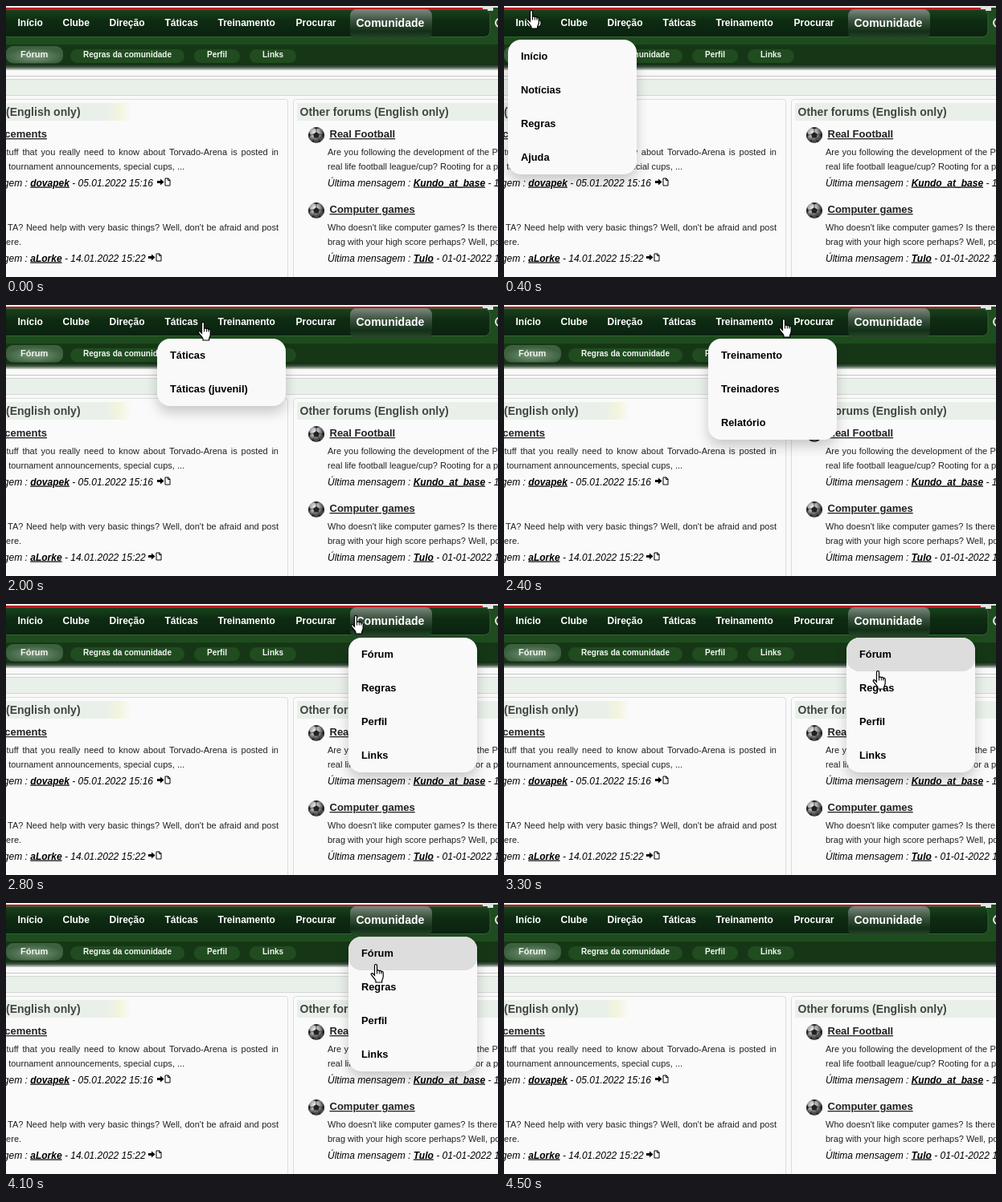
These frames come from a looping animation (612 px wide and 338 px high, 5.7 s). An HTML page:

```html
<!DOCTYPE html>
<html lang="pt">
<head>
<meta charset="utf-8">
<title>Menu</title>
<style>
html, body { margin: 0; width: 100%; height: 100%; overflow: hidden; background: #f9f9f9; }
#stage { position: relative; width: 612px; height: 338px; overflow: hidden; font-family: "Liberation Sans", Arial, sans-serif; }
#stage > svg { position: absolute; left: 0; top: 0; }
.nav { font-weight: bold; font-size: 12px; fill: #fff; }
.sub { font-weight: bold; font-size: 10px; fill: #f2f6f2; }
.head { font-weight: bold; font-size: 14px; fill: #444; }
.topic { font-weight: bold; font-size: 13px; fill: #222; text-decoration: underline; }
.body { font-size: 11px; fill: #222; }
.last { font-size: 12px; font-style: italic; fill: #000; }
.user { font-weight: bold; text-decoration: underline; }
.line { position: absolute; font-size: 11px; line-height: 13px; color: #222; white-space: nowrap; text-align: justify; text-align-last: justify; }
.menu { position: absolute; top: 42px; width: 160px; border-radius: 16px; background: #f9f9f9; box-shadow: 0 8px 16px rgba(0, 0, 0, .2); visibility: hidden; }
.menu div { height: 42px; padding-left: 16px; border-radius: 16px; font: bold 12.8px/41px "Liberation Sans", Arial, sans-serif; color: #000; }
.menu .on { background: #ddd; }
</style>
</head>
<body>
<div id="stage">
<svg width="612" height="338">
  <defs>
    <linearGradient id="bar" x2="0" y2="1">
      <stop stop-color="#1a421d"/><stop offset=".4" stop-color="#0e2c12"/><stop offset="1" stop-color="#0a2210"/>
    </linearGradient>
    <linearGradient id="tab" x2="0" y2="1">
      <stop stop-color="#7c887d"/><stop offset=".4" stop-color="#39503c"/><stop offset=".75" stop-color="#122f17"/><stop offset="1" stop-color="#2a4a2c"/>
    </linearGradient>
    <linearGradient id="edge" x2="0" y2="1">
      <stop stop-color="#0c290f"/><stop offset=".45" stop-color="#3c523e"/><stop offset="1" stop-color="#f9f9f9"/>
    </linearGradient>
    <radialGradient id="pill" cy=".6">
      <stop stop-color="#7b977b"/><stop offset="1" stop-color="#3d613f"/>
    </radialGradient>
    <linearGradient id="fade">
      <stop offset=".8" stop-color="#e9f0e9"/><stop offset=".9" stop-color="#f3f4dc"/><stop offset="1" stop-color="#fafafa"/>
    </linearGradient>
    <radialGradient id="leather" cx=".4" cy=".35">
      <stop stop-color="#f2f2f2"/><stop offset=".6" stop-color="#a2a2a2"/><stop offset="1" stop-color="#4a4a4a"/>
    </radialGradient>
    <g id="ball">
      <circle r="10" fill="url(#leather)"/>
      <path d="M0-4 4-1 2.5 3.5H-2.5L-4-1ZM-4-9 0-7.5 4-9 0-10ZM9-4 7 0 9.2 4 10 0ZM-9-4-7 0-9.2 4-10 0ZM-6 8-4 6-1 9.5ZM6 8 4 6 1 9.5Z" fill="#222"/>
      <path d="M0-4V-8M4-1 7 0M2.5 3.5 4 6M-2.5 3.5-4 6M-4-1-7 0" stroke="#444" stroke-width=".8"/>
    </g>
    <g id="goto">
      <path d="M0 3.5H4V1L8.500 5 4 9V6.500H0Z"/>
      <path d="M10 .5H14L16 2.500V9.500H10Z M13.500 .5V3H16" fill="#fff" stroke="#000"/>
    </g>
  </defs>

  <rect width="612" height="80" fill="#1e4c1e"/>
  <rect width="612" height="2" fill="#f6eeee"/>
  <rect y="2" width="593" height="2" fill="#bd1821"/>
  <path d="M593 0H612V2H606V6H599V4H593Z" fill="#e4e4e4"/>
  <rect x="-12" y="4.500" width="614" height="34" rx="7" fill="url(#bar)" stroke="#37603a"/>
  <rect x="428" y="4" width="102" height="37" rx="8" fill="url(#tab)"/>
  <circle cx="614" cy="21" r="5" fill="none" stroke="#e6e6e6" stroke-width="2"/>
  <g id="nav" class="nav"></g>

  <rect y="48" width="612" height="24" fill="#163716"/>
  <rect y="72" width="612" height="9" fill="url(#edge)"/>
  <rect x="0" y="50" width="71" height="21.500" rx="9" fill="url(#pill)"/>
  <g fill="#204c20">
    <rect x="80" y="54" width="142" height="17" rx="8.500"/>
    <rect x="234" y="54" width="57" height="17" rx="8.500"/>
    <rect x="303" y="54" width="58" height="17" rx="8.500"/>
  </g>
  <g class="sub">
    <text x="18" y="64" font-size="11" style="font-size:11px">Fórum</text>
    <text x="96" y="64">Regras da comunidade</text>
    <text x="250" y="64">Perfil</text>
    <text x="319" y="64">Links</text>
  </g>

  <rect y="80" width="612" height="258" fill="#f9f9f9"/>
  <rect y="87" width="612" height="1" fill="#c6c6c6"/>
  <rect x="-2" y="91.500" width="616" height="20" fill="#e9f0e9" stroke="#d2d6d2"/>
  <g fill="#fafafa" stroke="#dcdcdc">
    <rect x="-10" y="116.500" width="360.500" height="240" rx="3"/>
    <rect x="357.500" y="116.500" width="270" height="240" rx="3"/>
  </g>
  <rect y="121" width="156" height="22" fill="url(#fade)"/>
  <rect x="362" y="121" width="250" height="22" fill="#e9f0e9"/>
  <g class="head">
    <text x="0" y="137">(English only)</text>
    <text x="365.500" y="137">Other forums (English only)</text>
  </g>

  <use href="#ball" x="386" y="161"/>
  <use href="#ball" x="386" y="255"/>
  <g class="topic">
    <text x="51" y="164" text-anchor="end">Announcements</text>
    <text x="402.500" y="164">Real Football</text>
    <text x="402.500" y="258">Computer games</text>
  </g>
  <g class="body">
    <text x="-6" y="204">a tournament announcements, special cups, ...</text>
    <text x="-6" y="298">here.</text>
    <text x="400" y="186" word-spacing=".4">Are you following the development of the Premier</text>
    <text x="400" y="204">real life football league/cup? Rooting for a particular</text>
    <text x="400" y="280">Who doesn't like computer games? Is there a</text>
    <text x="400" y="298">brag with your high score perhaps? Well, post</text>
  </g>
  <g class="last">
    <text x="-76.500" y="224.500">Última mensagem : <tspan class="user">dovapek</tspan> - 05.01.2022 15:16</text>
    <text x="-76.500" y="318.500">Última mensagem : <tspan class="user">aLorke</tspan> - 14.01.2022 15:22</text>
    <text x="400" y="224.500">Última mensagem : <tspan class="user">Kundo_at_base</tspan> - 14.01.2022</text>
    <text x="400" y="318.500">Última mensagem : <tspan class="user">Tulo</tspan> - 01-01-2022 15:40</text>
  </g>
  <use href="#goto" x="188" y="214.500"/>
  <use href="#goto" x="177" y="308.500"/>
</svg>

<div class="line" style="left:-5px;width:344px;top:176px">stuff that you really need to know about Torvado-Arena is posted in</div>
<div class="line" style="left:2px;width:337px;top:270px">TA? Need help with very basic things? Well, don't be afraid and post</div>

<div id="menus"></div>

<svg id="hand" width="18" height="25" viewBox="-.5 -.5 18 25">
  <path d="M5 1.500c0-2 3-2 3 0v7c.3-1.500 2.600-1.500 2.800.2c.4-1.200 2.400-1 2.600.6c.5-.9 2.200-.7 2.300.8v5.500c0 2-1.600 3.400-1.600 5.400v1.500h-7.600v-1.600c0-1.600-4-5.200-5.600-8c-.7-1.500 1-2.400 2-1.400l2.100 2.300z" fill="#fff" stroke="#000" stroke-width="1.200"/>
  <path d="M8 8.500v3.500M10.800 8.700v3.300M13.400 9.300v2.700" stroke="#000"/>
</svg>
</div>

<script>
const LOOP = 5700, STEP = 100, SHOW = 300, HIDE = 4500;
const ROW = 42, MENU_TOP = 42;

// label, left edge of the hover area, entries
const nav = [
  ['Início', 5, ['Início', 'Notícias', 'Regras', 'Ajuda']],
  ['Clube', 61, ['Clube', 'Jogadores', 'Juvenis', 'Jogos', 'Transferências', 'Troféus', 'Histórico']],
  ['Direção', 119, ['Finanças', 'Estádio', 'Instalações', 'Patrocinadores', 'Calendário']],
  ['Táticas', 188, ['Táticas', 'Táticas (juvenil)']],
  ['Treinamento', 254, ['Treinamento', 'Treinadores', 'Relatório']],
  ['Procurar', 351, ['Jogadores', 'Clubes', 'Treinadores', 'Países', 'Transferências', 'Amistosos']],
  ['Comunidade', 426, ['Fórum', 'Regras', 'Perfil', 'Links']]
];

// time, x, y of the fingertip
const path = [
  [300, 30, 1], [400, 34, 5], [600, 60, 15], [900, 106, 21], [1100, 137, 21],
  [1400, 168, 21], [1500, 168, 21], [2000, 245, 21], [2100, 252, 20], [2300, 310, 18],
  [2500, 385, 16], [2600, 385, 16], [2700, 426, 14], [2800, 435, 14], [3200, 458, 58],
  [3500, 478, 134], [3700, 488, 179], [3800, 488, 179], [3900, 484, 164],
  [4100, 460, 76], [4200, 440, 28], [4400, 396, 3]
];

const hand = document.getElementById('hand');
const bar = document.getElementById('nav');
const holder = document.getElementById('menus');

const menus = nav.map(([label, x, items], i) => {
  const text = document.createElementNS(bar.namespaceURI, 'text');
  text.setAttribute('x', x + 9.5);
  text.setAttribute('y', 25);
  if (i === nav.length - 1) {
    text.setAttribute('y', 26);
    text.style.fontSize = '14px';
  }
  text.textContent = label;
  bar.append(text);

  const menu = document.createElement('div');
  menu.className = 'menu';
  menu.style.left = x + 'px';
  for (const item of items) {
    const row = document.createElement('div');
    row.textContent = item;
    menu.append(row);
  }
  holder.append(menu);
  return menu;
});

function pointAt(t) {
  let i = path.findIndex(p => p[0] > t);
  if (i < 0) i = path.length - 1;
  i = Math.max(i, 1);
  const [t0, x0, y0] = path[i - 1], [t1, x1, y1] = path[i];
  const k = Math.min(Math.max((t - t0) / (t1 - t0), 0), 1);
  return [x0 + (x1 - x0) * k, y0 + (y1 - y0) * k];
}

function draw(now) {
  const t = Math.floor(now % LOOP / STEP) * STEP;
  const active = t >= SHOW && t < HIDE;
  const [x, y] = pointAt(t);
  const open = active ? nav.filter(n => n[1] <= x).length - 1 : -1;
  const hover = Math.floor((y - MENU_TOP) / ROW);

  menus.forEach((menu, i) => {
    menu.style.visibility = i === open ? 'visible' : 'hidden';
    [...menu.children].forEach((row, j) => row.classList.toggle('on', i === open && j === hover));
  });
  hand.style.visibility = active ? 'visible' : 'hidden';
  hand.style.transform = `translate(${Math.round(x - 7)}px, ${Math.round(y)}px)`;
  requestAnimationFrame(draw);
}
draw(performance.now());
</script>
</body>
</html>
```
